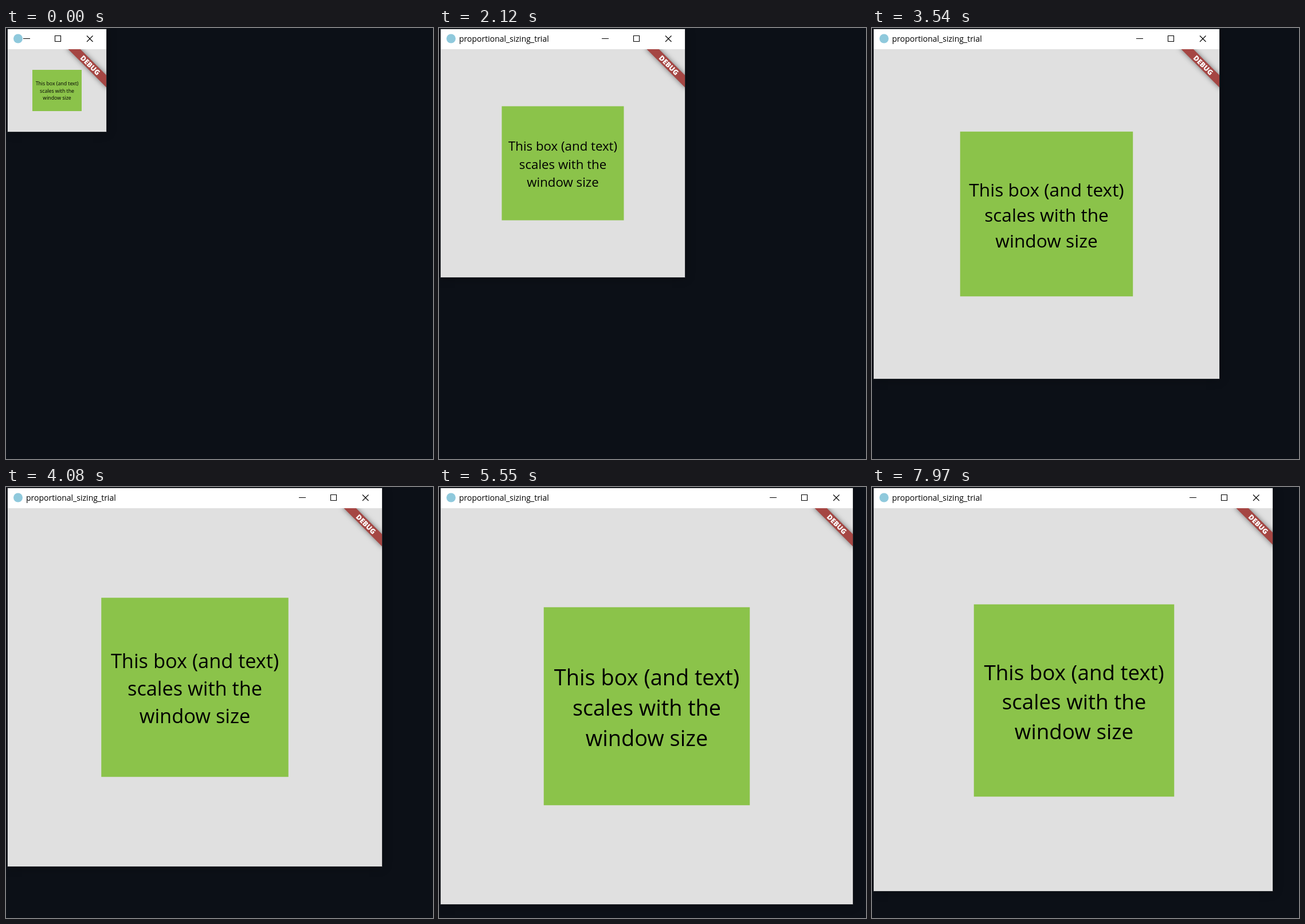
Animation of 745 by 752 pixels, one loop 8 s. Source, as an HTML page with a canvas:

```html
<!DOCTYPE html>
<html lang="en">
<head>
<meta charset="utf-8">
<title>Scaling box</title>
<style>
  html, body { margin: 0; width: 100%; height: 100%; overflow: hidden; background: #0c1017; }
  canvas { display: block; }
</style>
</head>
<body>
<canvas id="stage" width="745" height="752"></canvas>
<script>
const ctx = document.getElementById('stage').getContext('2d');
const LOOP = 8000, LEFT = 3, TOP = 2, BAR = 37;
const TITLE = 'proportional_sizing_trial';
const LINES = ['This box (and text)', 'scales with the', 'window size'];
const FONT = '"Open Sans", "Noto Sans", sans-serif';

// Time in ms and the window's right edge
const EDGE = [
  [0, 175], [310, 175], [720, 210], [1090, 257], [1230, 280], [1910, 400],
  [2750, 517], [3020, 545], [3540, 606], [4080, 656], [4340, 670], [4900, 699],
  [5220, 712], [6010, 736], [6310, 742], [7400, 742], [7970, 699], [8000, 697]
];

function edgeAt(time) {
  const t = Math.max(0, time);
  const i = EDGE.findIndex(knot => knot[0] > t);
  const [t0, x0] = EDGE[i - 1], [t1, x1] = EDGE[i];
  return x0 + (x1 - x0) * (t - t0) / (t1 - t0);
}

function fill(color, x, y, w, h) {
  ctx.fillStyle = color;
  ctx.fillRect(x, y, w, h);
}

function text(str, x, y, font, color, align) {
  ctx.font = font + ' ' + FONT;
  ctx.fillStyle = color;
  ctx.textAlign = align;
  ctx.fillText(str, x, y);
}

function fitTitle(room) {
  ctx.font = '14px ' + FONT;
  if (ctx.measureText(TITLE).width <= room) return TITLE;
  for (let n = TITLE.length - 1; n > 0; n--) {
    const cut = TITLE.slice(0, n) + '...';
    if (ctx.measureText(cut).width <= room) return cut;
  }
  return '';
}

function drawTitleBar(right) {
  fill('#fff', LEFT, TOP, right - LEFT, BAR - TOP);
  ctx.fillStyle = '#8fc9dc';
  ctx.beginPath();
  ctx.arc(21, 18.5, 8, 0, 2 * Math.PI);
  ctx.fill();
  text(fitTitle(right - 204), 35, 24, '14px', '#000', 'left');

  ctx.strokeStyle = '#000';
  ctx.lineWidth = 1.1;
  ctx.beginPath();
  ctx.moveTo(right - 145, 18.5);
  ctx.lineTo(right - 133, 18.5);
  ctx.rect(right - 89.5, 13.5, 10, 10);
  ctx.moveTo(right - 34, 13.5);
  ctx.lineTo(right - 23.5, 24);
  ctx.moveTo(right - 23.5, 13.5);
  ctx.lineTo(right - 34, 24);
  ctx.stroke();
}

function drawBanner(right) {
  ctx.save();
  ctx.translate(right, BAR);
  ctx.rotate(Math.PI / 4);
  ctx.shadowColor = 'rgba(0,0,0,.5)';
  ctx.shadowBlur = 10;
  fill('#a54643', -50, 32, 100, 15);
  ctx.shadowColor = 'transparent';
  text('DEBUG', 0, 44, '900 12.3px', '#fff', 'center');
  ctx.restore();
}

function drawContent(right) {
  const w = right - LEFT, h = right + 6 - BAR;
  const cx = LEFT + w / 2, cy = BAR + h / 2;
  fill('#8bc34a', cx - w / 4, cy - h / 4, w / 2, h / 2);
  const size = 0.0532 * w - 0.4, leading = 0.0736 * w;
  LINES.forEach((line, i) =>
    text(line, cx, cy + (i - 1) * leading + size * 0.43, size + 'px', '#000', 'center'));
  drawBanner(right);
}

function draw(t) {
  const right = Math.round(edgeAt(t));
  // The content trails the frame slightly while the window shrinks
  const contentRight = Math.max(right, Math.round(edgeAt(t - 35)));
  const width = right - LEFT, height = right + 6 - TOP;

  fill('#0c1017', 0, 0, 745, 752);
  ctx.save();
  ctx.shadowColor = 'rgba(0,0,0,.3)';
  ctx.shadowBlur = 16;
  fill('#26292d', LEFT - 1, TOP - 1, width + 2, height + 2);
  ctx.restore();
  fill('#e0e0e0', LEFT, TOP, width, height);

  ctx.save();
  ctx.beginPath();
  ctx.rect(LEFT, BAR, width, right + 6 - BAR);
  ctx.clip();
  drawContent(contentRight);
  ctx.restore();
  drawTitleBar(right);
}

function frame() {
  draw(performance.now() % LOOP);
  requestAnimationFrame(frame);
}
frame();
</script>
</body>
</html>
```
